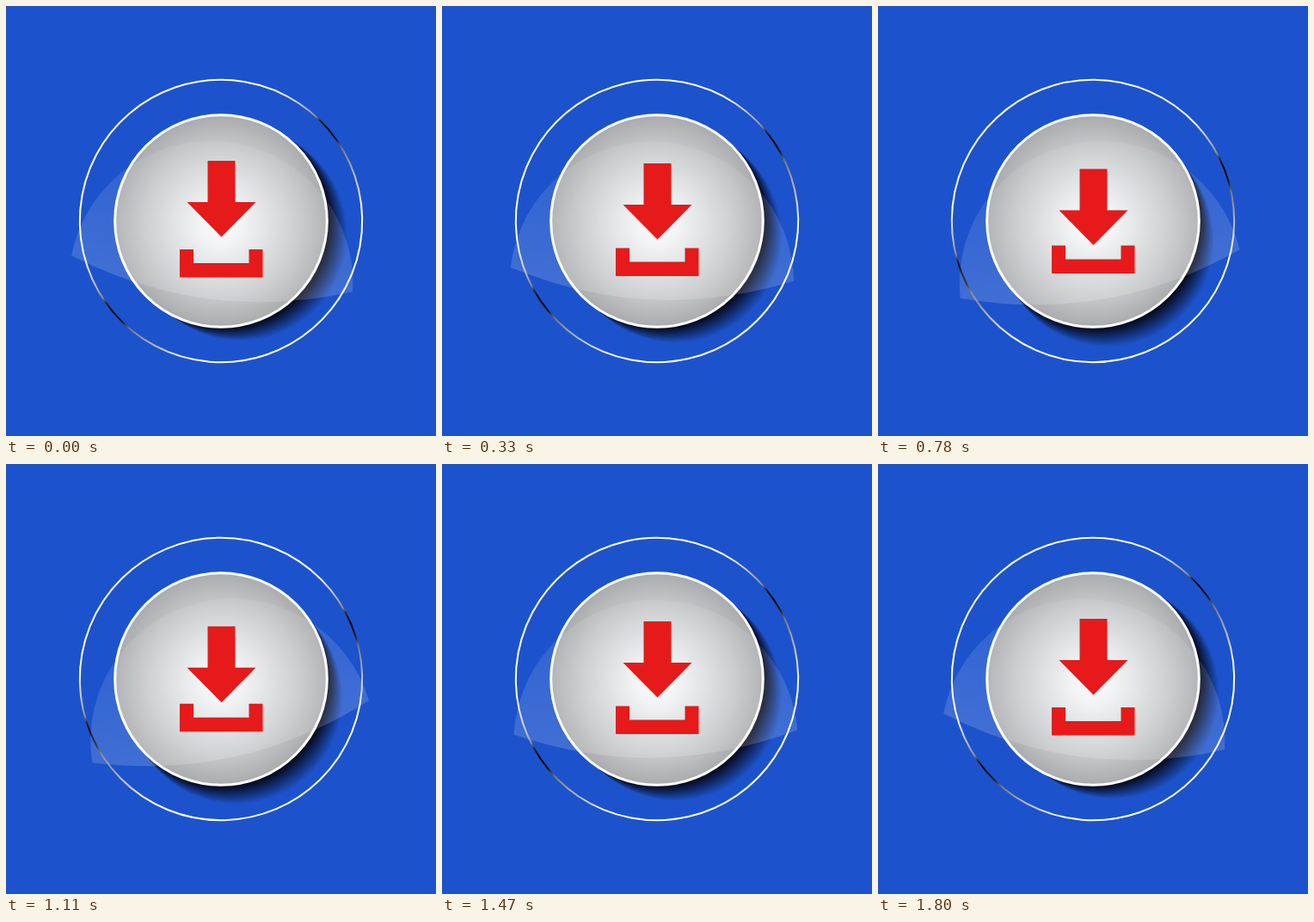
Animation, 500 px wide and 500 px high, one loop 1860 ms. Source, as an HTML page with a canvas:

```html
<!DOCTYPE html>
<html lang="en">
<head>
<meta charset="utf-8">
<title>Download button</title>
<style>
html, body { margin: 0; width: 100%; height: 100%; overflow: hidden; background: #1c53cc; }
canvas { display: block; width: 500px; height: 500px; }
</style>
</head>
<body>
<canvas id="stage" width="500" height="500"></canvas>
<script>
const ctx = document.getElementById('stage').getContext('2d');
const LOOP = 1860, STEP = 30, END = 1800;
const BG = [28, 83, 204], DARK = [8, 14, 38];
const rad = d => d * Math.PI / 180;

// Eases 0 -> 1 at the peak time and back to 0 at END.
function swing(t, peak) {
  const p = t < peak ? t / peak : (END - t) / (END - peak);
  return (1 - Math.cos(Math.PI * p)) / 2;
}

function addStops(g, stops) {
  for (const [at, color] of stops) g.addColorStop(at, color);
  return g;
}

function disc(x, y, r, fill) {
  ctx.beginPath();
  ctx.arc(x, y, r, 0, Math.PI * 2);
  ctx.fillStyle = fill;
  ctx.fill();
}

function polygon(points, dy) {
  ctx.beginPath();
  for (const [x, y] of points) ctx.lineTo(x, y + dy);
  ctx.closePath();
  ctx.fillStyle = '#e61a1a';
  ctx.fill();
}

const face = addStops(ctx.createRadialGradient(0, 4, 0, 0, 0, 124), [
  [0, '#fafcfc'], [0.2, '#f0f2f3'], [0.45, '#dcdee0'], [0.72, '#c6c7c9'], [1, '#a9aaac']
]);

const metal = addStops(ctx.createLinearGradient(0, -164, 0, 164), [
  [0, '#fff'], [0.28, '#fff'], [0.39, '#b4b4b6'], [0.435, '#8c8c90'], [0.455, '#2a2a2e'],
  [0.49, '#000'], [0.545, '#15151a'], [0.58, '#77777c'], [0.7, '#c4c4c8'], [0.8, '#fff'], [1, '#fff']
]);

const sheen = addStops(ctx.createLinearGradient(0, -92, 0, 92), [
  [0, 'rgba(255,255,255,0.07)'], [0.5, 'rgba(255,255,255,0.12)'], [1, 'rgba(255,255,255,0.17)']
]);

const ARROW = [
  [234.5, 180], [266.5, 180], [266.5, 228], [290.5, 228], [250.5, 268.5], [210.5, 228], [234.5, 228]
];
const TRAY = [
  [202, 283], [218, 283], [218, 299], [282.5, 299], [282.5, 283], [298.5, 283], [298.5, 315.5], [202, 315.5]
];

function drawRing(turn) {
  ctx.save();
  ctx.rotate(rad(turn - 40.4));
  ctx.beginPath();
  ctx.arc(0, 0, 164.2, 0, Math.PI * 2);
  ctx.lineWidth = 2;
  ctx.strokeStyle = metal;
  ctx.stroke();
  ctx.restore();
}

function drawShadow(turn) {
  const a = rad(34 + turn), n = 20;
  for (let i = 1; i <= n; i++) {
    const k = i / n, d = 29 - 25 * k;
    const rgb = BG.map((c, j) => Math.round(c + (DARK[j] - c) * k));
    disc(d * Math.cos(a), d * Math.sin(a), 123.5, `rgb(${rgb})`);
  }
}

function drawButton() {
  disc(0, 0, 124, face);
  ctx.beginPath();
  ctx.arc(0, 0, 123.3, 0, Math.PI * 2);
  ctx.lineWidth = 3;
  ctx.strokeStyle = '#fff';
  ctx.stroke();
}

function drawGlass(turn) {
  ctx.save();
  ctx.rotate(rad(7.3 - turn));
  ctx.beginPath();
  ctx.arc(-2.6, 73, 165.2, rad(183.8), rad(356.2));
  ctx.quadraticCurveTo(-2.6, 121, -167.4, 62);
  ctx.closePath();
  ctx.fillStyle = sheen;
  ctx.fill();
  ctx.restore();
}

function draw(t) {
  const s = swing(t, 900);
  ctx.fillStyle = `rgb(${BG})`;
  ctx.fillRect(0, 0, 500, 500);
  ctx.save();
  ctx.translate(250, 250);
  drawShadow(20 * s);
  drawRing(20 * s);
  drawButton();
  drawGlass(20.3 * swing(t, 1050));
  ctx.restore();
  polygon(ARROW, 10 * s);
  polygon(TRAY, -4.8 * s);
}

function tick() {
  const t = performance.now() % LOOP;
  draw(Math.min(Math.floor(t / STEP) * STEP, END));
  requestAnimationFrame(tick);
}
tick();
</script>
</body>
</html>
```
